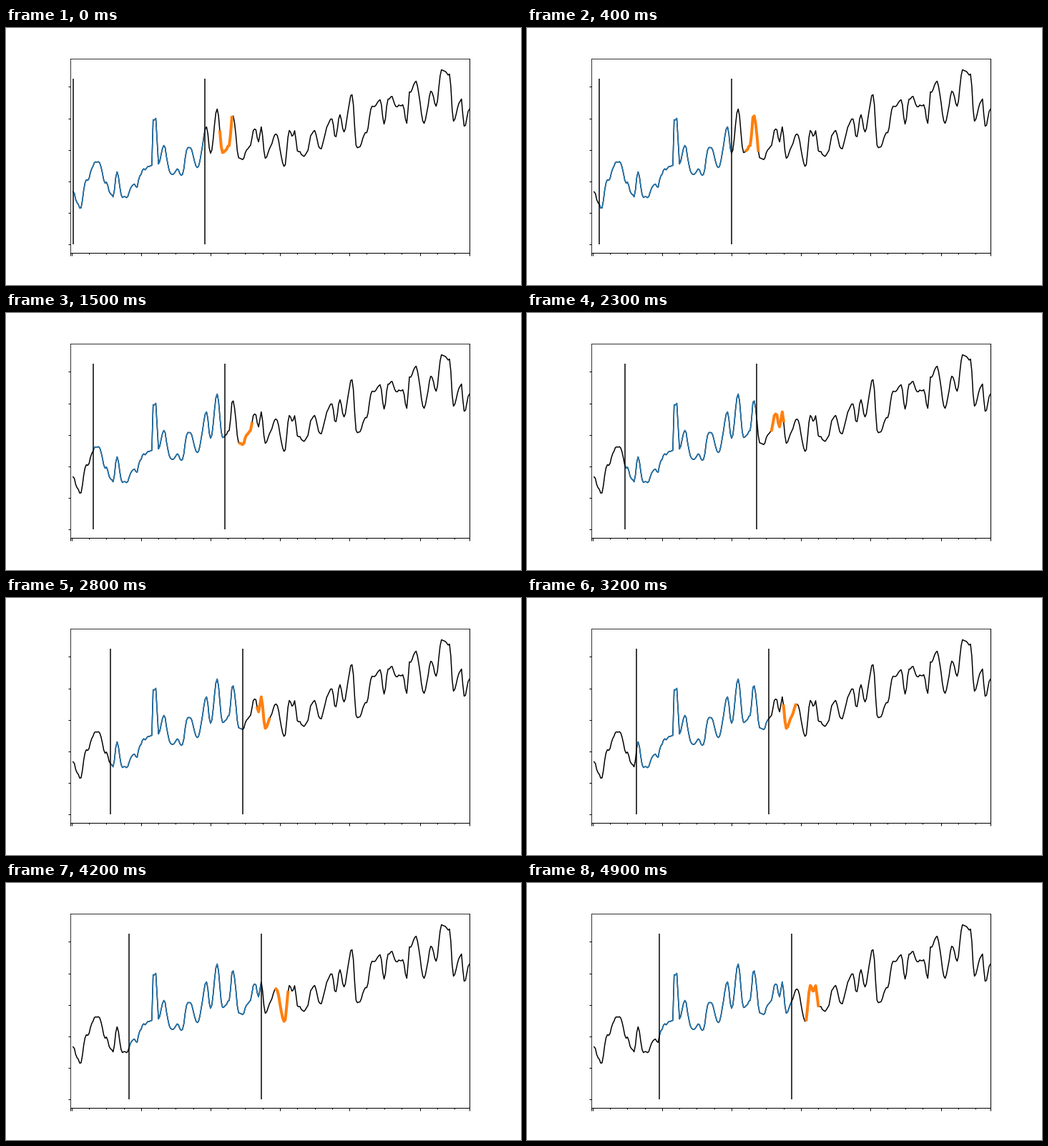
A matplotlib script for the animation above (5000 ms loop, 720 by 360 pixels).

```python
import matplotlib.pyplot as plt
import numpy as np
from matplotlib.animation import FuncAnimation

WIDTH, HEIGHT, DPI = 720, 360, 72
FRAMES, INTERVAL = 50, 100
HISTORY = 99               # weeks between the two markers
GAP, HORIZON = 110, 10     # start and length of the forecast window
LAST_WEEK = 297
RIPPLE = 6                 # largest ripple between key points, in pixels

# Main peaks and valleys as (week, height on the stage in pixels).
KEY_POINTS = [
    (0, 229), (5.5, 253), (10, 212), (17, 187), (30, 236), (33, 201),
    (37, 237), (59, 192), (60, 128), (62, 126), (64, 190), (68, 164),
    (73, 203), (81, 206), (86, 167), (93, 195), (100, 138), (103, 175),
    (108, 113), (112, 174), (117, 164), (119.5, 121), (125, 182), (132, 166),
    (136, 141), (139, 159), (141, 138), (144, 182), (152, 148), (158.5, 194),
    (162, 143), (172, 178), (181, 143), (184.5, 168), (194, 127), (196.5, 152),
    (200, 121), (203, 145), (209, 93), (212.5, 167), (225.5, 110), (230, 100),
    (233, 134), (236, 99), (247, 107), (250, 133), (252, 89), (257, 74),
    (263, 133), (268, 88), (272, 109), (276, 58), (282, 64), (285, 130),
    (291, 99), (293, 137), (297, 113),
]


def make_series(weeks):
    """Join key points with half cosine waves and a ripple that fades at each one."""
    key_weeks, levels = np.transpose(KEY_POINTS)
    knots = np.arange(len(levels))
    position = np.interp(weeks, key_weeks, knots)
    start = np.floor(position)
    phase = np.pi * (position - start)
    curve = np.interp(start + (1 - np.cos(phase)) / 2, knots, levels)

    gaps = np.append(np.diff(key_weeks), 0)[start.astype(int)]
    noise = np.random.default_rng(4).normal(size=len(weeks))
    noise = np.convolve(noise, [0.4, 0.8, 0.4], mode="same")
    return curve + np.minimum(gaps / 2, RIPPLE) * np.sin(phase) * noise + 0.5


weeks = np.arange(LAST_WEEK + 1)
series = make_series(weeks)

fig, ax = plt.subplots(figsize=(WIDTH / DPI, HEIGHT / DPI), dpi=DPI, facecolor="white")
fig.subplots_adjust(left=0.125, right=0.9, bottom=0.125, top=0.88)
ax.set_xlim(-2, LAST_WEEK)
ax.set_ylim(315, 43.2)
for side in ("right", "bottom"):
    ax.spines[side].set_linewidth(1)

years = [-1, 51, 103, 155, 207, 260]
quarters = [year + 13 * q for year in years for q in (1, 2, 3)]
ax.set_xticks([-2, *years, LAST_WEEK])
ax.set_xticks([week for week in quarters if week < LAST_WEEK], minor=True)
ax.set_yticks(303.4 - 44.2 * np.arange(6))
ax.tick_params(which="both", width=1, labelbottom=False, labelleft=False)

ax.plot(weeks, series, color="black", lw=1.5)
history, = ax.plot([], [], color="#1f77b4", lw=1.5)
forecast, = ax.plot([], [], color="#ff7f0e", lw=4)
markers = [ax.plot([], [], color="black", lw=1.5, solid_capstyle="butt")[0]
           for _ in range(2)]


def show_span(line, first, count):
    span = slice(first, first + count)
    line.set_data(weeks[span], series[span])


def update(frame):
    show_span(history, frame, HISTORY + 1)
    show_span(forecast, frame + GAP, HORIZON)
    for marker, week in zip(markers, (frame, frame + HISTORY)):
        marker.set_data([week, week], [71, 303])
    return [history, forecast, *markers]


animation = FuncAnimation(fig, update, frames=FRAMES, interval=INTERVAL,
                          repeat=True, repeat_delay=0, blit=False)
plt.show()
```
